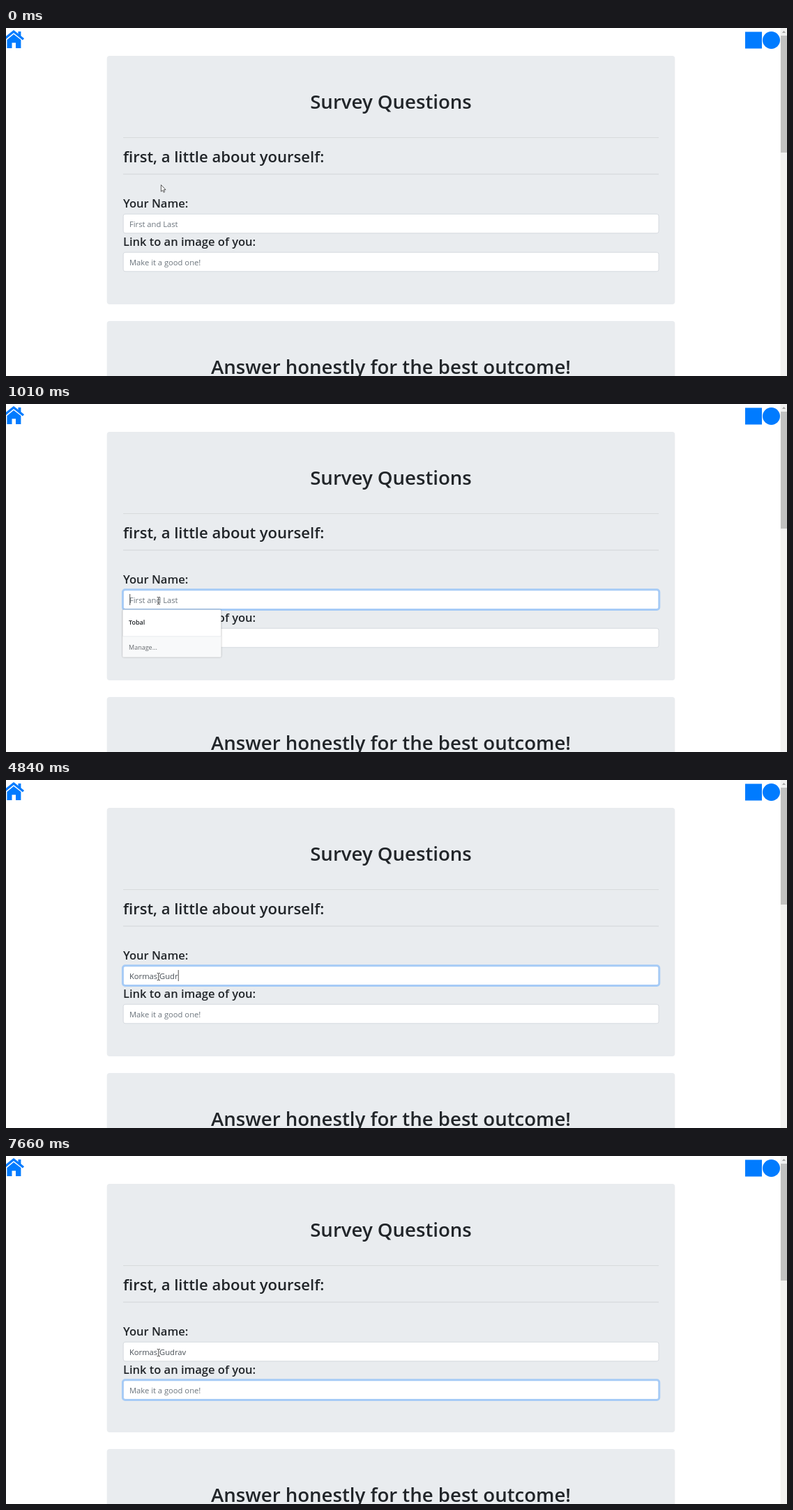
Write an HTML page that moves like this. It is 1120 by 500 pixels and loops after 8 s.

```html
<!DOCTYPE html>
<html lang="en">
<head>
<meta charset="utf-8">
<title>Survey form</title>
<style>
  html, body { margin: 0; width: 100%; height: 100%; overflow: hidden; background: #fff; }
  svg { display: block; width: 1120px; height: 500px; }
  text { font-family: "Open Sans", "Noto Sans", sans-serif; white-space: pre; fill: #212529; }
  .h1 { font-size: 27.6px; font-weight: 600; text-anchor: middle; }
  .h2 { font-size: 22.05px; font-weight: 600; }
  .label { font-size: 16.5px; font-weight: 600; }
  .value { font-size: 11.2px; fill: #495057; }
  .hint { font-size: 11.2px; fill: #6c757d; }
  .small { font-size: 9px; }
  .card { fill: #e9ecef; }
  .blue { fill: #007bff; }
  .field { fill: #fff; stroke: #ced4da; stroke-width: .8; }
  .ring { fill: none; stroke: #a6cbf6; stroke-width: 2.9; }
  #menu > rect:first-child { filter: drop-shadow(0 .7px 1px rgba(0, 0, 0, .4)); }
</style>
</head>
<body>
<svg viewBox="0 0 1120 500">
  <g class="blue">
    <path d="M-5 17.8L11 5L25 16.2" fill="none" stroke="#007bff" stroke-width="3.3"/>
    <path d="M17.5 5H21.4V14L17.5 11Z"/>
    <path d="M1.4 17L11 9L21.4 17V29H14V21.3H8.5V29H1.4Z"/>
    <rect x="1060" y="5.5" width="24" height="24"/>
    <circle cx="1097.5" cy="17.5" r="12.5"/>
  </g>

  <rect x="1110.5" width="9.5" height="500" fill="#f1f1f1"/>
  <rect x="1111" y="11" width="9" height="168" fill="#c1c1c1"/>
  <path d="M1113 7L1115.5 4L1118 7Z" fill="#a3a3a3"/>

  <rect class="card" x="144.7" y="40" width="814.6" height="357" rx="4"/>
  <rect class="card" x="144.7" y="421" width="814.6" height="120" rx="4"/>
  <text class="h1" x="552" y="116">Survey Questions</text>
  <rect x="168" y="157" width="768" height="1" fill="#000" opacity=".08"/>
  <text class="h2" x="168" y="193">first, a little about yourself:</text>
  <rect x="168" y="209.5" width="768" height="1" fill="#000" opacity=".1"/>
  <text class="label" x="168" y="258">Your Name:</text>
  <text class="label" x="168" y="313">Link to an image of you:</text>
  <text class="h1" x="552" y="496.5">Answer honestly for the best outcome!</text>

  <rect class="field" x="168.2" y="267.3" width="767.8" height="27.5" rx="2.8"/>
  <rect class="field" x="168.2" y="322.3" width="767.8" height="27.5" rx="2.8"/>
  <rect class="ring" id="nameRing" x="167.4" y="266.7" width="769.4" height="28.8" rx="3.5"/>
  <rect class="ring" id="linkRing" x="167.4" y="321.7" width="769.4" height="28.8" rx="3.5"/>
  <text class="hint" id="hint" x="177" y="285.5">First and Last</text>
  <text class="value" id="name" x="177" y="285.5"></text>
  <text class="hint" x="177" y="340.5">Make it a good one!</text>

  <g id="menu">
    <rect x="167.4" y="295.6" width="141" height="67.9" rx="1.5" fill="#fff"/>
    <path d="M167.4 334H308.4V362Q308.4 363.5 307 363.5H169Q167.4 363.5 167.4 362Z" fill="#f8f9fa"/>
    <rect x="167.4" y="333.5" width="141" height=".8" fill="#e4e6e9"/>
    <text class="small" x="176" y="317.3" font-weight="600">Tobal</text>
    <text class="small" x="176" y="352.7" style="fill:#666a6e">Manage...</text>
  </g>

  <rect id="caret" width="1" height="16" fill="#555"/>
  <circle id="glow" cx="217.5" cy="282" r="8" fill="#fff25a" style="mix-blend-mode:multiply"/>
  <path id="arrow" d="M.4 .4V10L2.6 8L4.1 11.2L5.6 10.5L4.2 7.4H7Z" fill="#fff" stroke="#333" stroke-width=".8"/>
  <path id="beam" d="M-2.2 -5H-.6L0 -4.4L.6 -5H2.2M0 -4.4V4.4M-2.2 5H-.6L0 4.4L.6 5H2.2" fill="none" stroke="#333" stroke-width=".9"/>
</svg>
<script>
const LOOP = 8000, BLINK = 520;
const CLICK = 870, TYPE = 3030, TAB = 6100;
const NAME = "Kormas Gudrav";

const $ = id => document.getElementById(id);
const ramp = (t, from, to) => Math.min(1, Math.max(0, (t - from) / (to - from)));
const fade = (id, value) => $(id).setAttribute("opacity", +value);
const move = (id, x, y) => $(id).setAttribute("transform", `translate(${x} ${y})`);

// Each word starts slowly and then speeds up.
const keyTime = i => TYPE + 190 * i + 110 * Math.sin(i * Math.PI / 3);

function drawPointer(t) {
  const glide = ramp(t, 60, 400), nudge = ramp(t, 540, 630);
  const x = 222 - 4 * glide - 8 * Math.sin(Math.PI * glide) + .8 * nudge;
  const y = 225 + 53 * glide + 4.6 * nudge;
  const overField = y > 267;
  move("arrow", x, y);
  move("beam", x, y);
  fade("arrow", !overField);
  fade("beam", overField);
  fade("glow", t >= CLICK && 1 - ramp(t, CLICK + 50, CLICK + 140));
}

function drawForm(t) {
  const typed = [...NAME].filter((_, i) => keyTime(i) <= t).length;
  const name = $("name");
  name.textContent = NAME.slice(0, typed);
  fade("hint", !typed);
  fade("menu", t >= CLICK && !typed);

  const leave = ramp(t, TAB + 50, TAB + 160);
  fade("nameRing", ramp(t, CLICK + 50, CLICK + 140) - leave);
  fade("linkRing", leave);

  // The caret stays lit after every key press, then blinks.
  const onLink = t >= TAB;
  const lastInput = onLink ? TAB : typed ? keyTime(typed - 1) : CLICK;
  const lit = t >= CLICK && Math.floor((t - lastInput) / BLINK) % 2 === 0;
  const width = typed && !onLink ? name.getComputedTextLength() : 0;
  move("caret", 177.2 + width, onLink ? 328 : 273);
  fade("caret", lit);
}

const start = performance.now();
function tick(now) {
  const t = Math.max(0, now - start) % LOOP;
  drawPointer(t);
  drawForm(t);
  requestAnimationFrame(tick);
}
tick(start);
</script>
</body>
</html>
```
